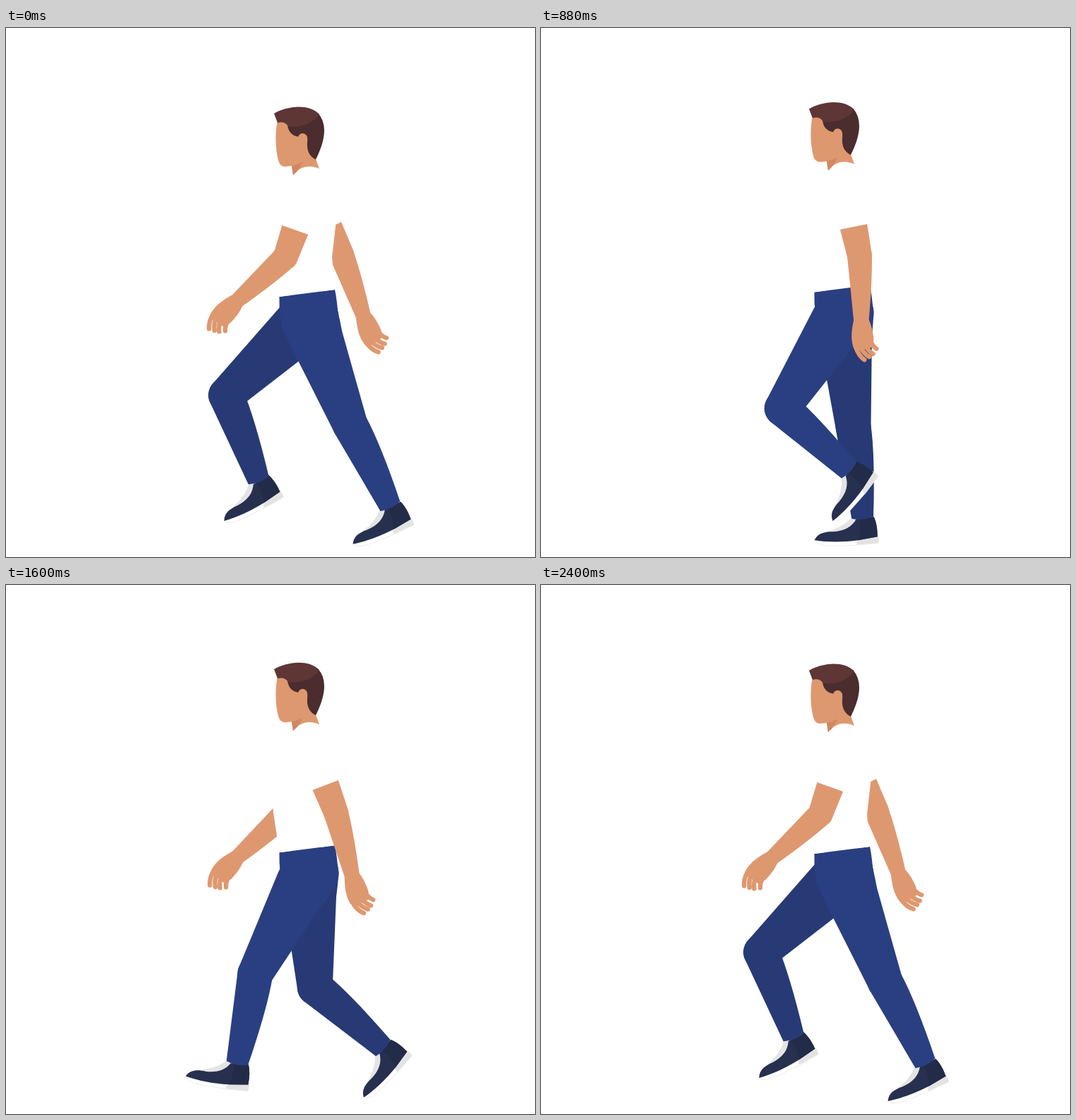
Animation, 748 px wide and 748 px high, one loop 2.44 s. Source, as an HTML page:

```html
<!DOCTYPE html>
<html lang="en">
<head>
<meta charset="utf-8">
<title>Walk cycle</title>
<style>
  html, body { margin: 0; width: 100%; height: 100%; overflow: hidden; background: #fff; }
  svg { display: block; width: 100vw; height: 100vh; }
  .skin { fill: #de9870; }
  .fingers { fill: none; stroke: #de9870; stroke-width: 6.4; stroke-linecap: round; }
  .near { fill: #2a3f81; }
  .far { fill: #283a75; }
  .shirt { fill: #fff; }
</style>
</head>
<body>
<svg viewBox="0 0 748 748" xmlns="http://www.w3.org/2000/svg">
  <defs>
    <!-- origin at the ankle, toe to the left -->
    <g id="shoe">
      <path fill="#fff" stroke="#e2e2e2" stroke-width=".6" d="M-68 30 C-66 37 -56 39 -44 39 L-7 38 L22 35 L22 25 L-6 29Z"/>
      <path fill="#e3e3e3" d="M-8 31 L21 25 Q24 29 22 35 L-9 37.5Z"/>
      <path fill="#e3e4e4" d="M-51 19 C-36 15 -24 9 -14 -3 L-7 1 L-14 14 L-40 21Z"/>
      <path fill="#27304f" d="M-68 31 C-63 20 -52 19 -42 19 C-25 18 -15 12 -9 1 L16 -2 C20 7 21 16 21 26 L-6 31 C-28 34 -50 34 -68 31Z"/>
      <path fill="#222b47" d="M-4 0 L16 -2 C20 7 21 16 21 26 L-6 31 C-3 20 -2 10 -4 0Z"/>
    </g>
    <!-- origin at the wrist -->
    <g id="hand">
      <path class="skin" d="M-10.5 -2 C-14 12 -16 26 -12 37 L-8 43 L14 38 L17 27 C16 16 15 8 10.5 -2Z"/>
      <path class="fingers" d="M-9 36 Q-5 49 3 55 M-3 35 Q2 46 10 51 M4 33 Q8 42 15.500 47 M12 26 Q14 35 20.500 40"/>
    </g>
    <g id="leg">
      <g class="thigh">
        <path d="M-41 0 A41 41 0 0 1 41 0 Q39 18 36 34 L25 161 A25 25 0 0 1 -25 161 L-40 20Z"/>
        <g class="shin" >
          <g class="foot"><use href="#shoe"/></g>
          <path d="M-25 0 A25 25 0 0 1 25 0 Q26.500 45 15.500 129 Q0 134 -15.500 129Z"/>
        </g>
      </g>
    </g>
    <g id="arm">
      <g class="upper">
        <path class="skin" d="M-19.500 62 L19.500 62 L17.500 103 A17.500 17.500 0 0 1 -17.500 103Z"/>
        <g class="fore">
          <path class="skin" d="M-17.500 0 A17.500 17.500 0 0 1 17.500 0 Q17 40 10.500 94 L-10.500 94Z"/>
          <use href="#hand" y="93"/>
        </g>
      </g>
    </g>
  </defs>
  <g id="body">
    <g id="farArm" transform="translate(429.5 227)"></g>
    <g id="farLeg" class="far" transform="translate(429.5 410)"></g>
    <path class="near" d="M386.500 380 L465 370 Q468 384 470 410 L388 410 Q386 395 386.500 380Z"/>
    <g id="nearLeg" class="near" transform="translate(429.5 410)"></g>
    <path class="shirt" d="M406 208 Q424 188 443 199 Q470 205 470 240 L466 280 L461 324 L465 370 L386.500 380 L378 323 L372 250 Q380 212 406 208Z"/>
    <g id="head">
      <path class="skin" d="M384 131 C380 148 381 172 385 187 Q387 196 395 196 L404 195 L406 208 C415 197 427 192 443 199 L438 185 L430 140Z"/>
      <path fill="#cf8861" d="M404 195 Q413 193 419 189 Q415 201 406 208Z"/>
      <path fill="#4b2c2f" d="M398 136 Q399 152 415 154 L426 160 C425 172 428 181 438 186 C443 176 450 160 450 145 Q450 130 441 120Z"/>
      <path fill="#5e3635" d="M379 121 C394 112 426 105 443 122 C433 137 414 141 399 139 Q394 131 384 134Z"/>
      <path class="skin" d="M413 156 C413 148 423 146 426 154 Q427 163 424 170 L414 170Z"/>
    </g>
    <g id="nearArm" transform="translate(429.5 227)"></g>
  </g>
</svg>
<script>
const CYCLE = 2400, HOLD = 40;

// Periodic monotone cubic through [time, value, time, value, ...]
function track(...keys) {
  const n = keys.length / 2;
  const time = i => keys[2 * ((i + n) % n)] + CYCLE * Math.floor(i / n);
  const value = i => keys[2 * ((i + n) % n) + 1];
  const slope = i => (value(i + 1) - value(i)) / (time(i + 1) - time(i));
  const tangent = i => {
    const a = slope(i - 1), b = slope(i);
    return a * b > 0 ? 2 * a * b / (a + b) : 0;
  };
  return t => {
    let i = n - 1;
    while (time(i) > t) i--;
    const h = time(i + 1) - time(i), u = (t - time(i)) / h, v = 1 - u;
    return v * v * (1 + 2 * u) * value(i) + u * u * (3 - 2 * u) * value(i + 1)
      + h * u * v * (v * tangent(i) - u * tangent(i + 1));
  };
}

function build(id, kind) {
  const root = document.getElementById(id);
  for (const part of document.getElementById(kind).children) root.append(part.cloneNode(true));
  return name => root.querySelector('.' + name);
}

function turn(node, y, angle) {
  node.setAttribute('transform', `translate(0 ${y}) rotate(${angle.toFixed(3)})`);
}

// Limb angles are measured from straight down, positive to the right
function leg(id, thigh, shin, foot) {
  const part = build(id, 'leg');
  const [a, b, c] = ['thigh', 'shin', 'foot'].map(part);
  return t => {
    turn(a, 0, -thigh(t));
    turn(b, 161, thigh(t) - shin(t));
    turn(c, 130, shin(t) + foot(t));
  };
}

function arm(id, upper, fore) {
  const part = build(id, 'arm');
  const [a, b] = ['upper', 'fore'].map(part);
  return t => {
    turn(a, 0, -upper(t));
    turn(b, 103, upper(t) - fore(t));
  };
}

const limbs = [
  leg('nearLeg',
    track(0, 20.7, 100, 25, 280, 13.3, 400, 3, 880, -33.4, 1240, -46.3, 1420, -43, 1600, -28.6, 2080, 6.5),
    track(0, 26.2, 100, 33, 280, 43.4, 400, 48, 640, 57, 880, 47.2, 1240, 3.5, 1430, -18, 1600, -11.4, 2080, 9.2),
    track(0, -20, 100, -28, 280, -36.4, 640, -53, 880, -47, 1240, -6.4, 1430, 16, 1600, 11, 1750, 0, 2080, 0, 2220, -4)),
  leg('farLeg',
    track(0, -47.3, 280, -43, 420, -29, 880, 4.3, 1160, 20, 1240, 25.2, 1430, 15, 1600, 2.6, 2080, -29.8),
    track(0, 20.9, 280, -19.3, 420, -12, 880, 5.8, 1160, 25, 1240, 33.3, 1600, 48.4, 1840, 58, 2080, 51.5),
    track(0, -24.4, 280, 16.5, 420, 11, 570, 0, 880, 0, 1040, -4, 1240, -28.5, 1600, -43.4, 1840, -54, 2080, -51.7)),
  arm('nearArm',
    track(0, -19.5, 170, -22.5, 280, -21.5, 880, 11.7, 1240, 35.3, 1310, 36.5, 1600, 21, 2080, -4.6),
    track(0, -48, 170, -51, 280, -49.6, 880, 1.5, 1240, 25.7, 1310, 27, 1600, 14.3, 2080, -19.4)),
  arm('farArm',
    track(0, 25.8, 190, 34, 280, 32, 880, -2, 1240, -17.2, 1420, -21.5, 1600, -19.4, 2080, 4),
    track(0, 19.5, 190, 28, 280, 26, 880, -14, 1240, -46.3, 1420, -50, 1600, -47.5, 2080, -7))
];

const body = document.getElementById('body');
const bob = track(0, 0, 280, -1, 480, -3.8, 560, -7, 700, -9.5, 880, -6.6, 1120, -2.5,
  1220, 0, 1600, -1.8, 1680, -3.6, 1900, -9.5, 2080, -7.6, 2280, -3.5);

function draw() {
  const t = Math.floor(performance.now() % (CYCLE + HOLD) / HOLD) * HOLD % CYCLE;
  body.setAttribute('transform', `translate(0 ${bob(t).toFixed(3)})`);
  for (const pose of limbs) pose(t);
  requestAnimationFrame(draw);
}
draw();
</script>
</body>
</html>
```
